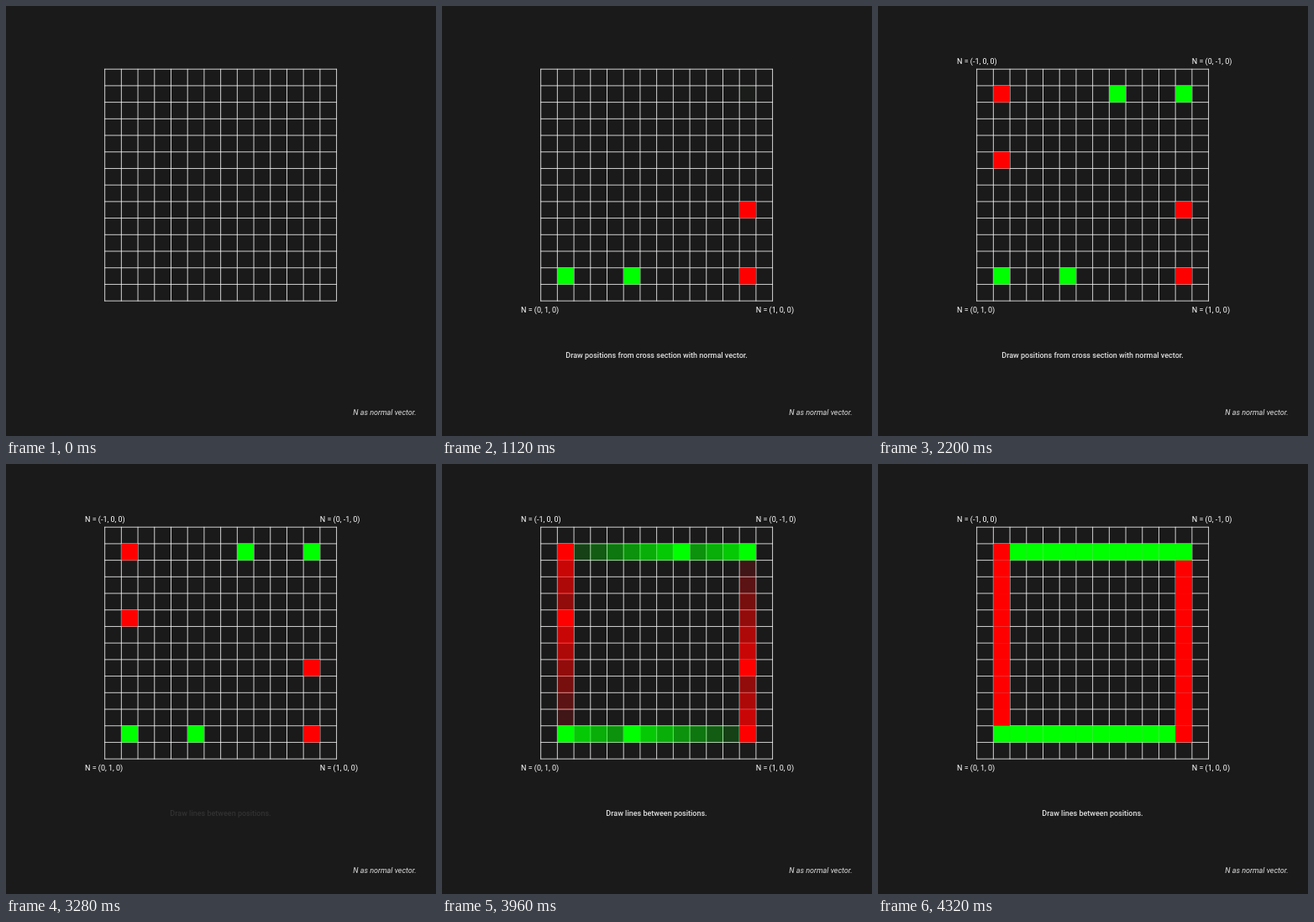
These frames come from a looping animation (512x512 px, 6 s). An HTML page with a canvas:

```html
<!DOCTYPE html>
<html lang="en">
<head>
<meta charset="utf-8">
<title>Normal vectors</title>
<style>
  html, body { margin: 0; height: 100%; overflow: hidden; background: #1a1a1a; }
  canvas { display: block; width: 100vw; height: 100vh; }
</style>
</head>
<body>
<canvas id="stage" width="512" height="512"></canvas>
<script>
const ctx = document.getElementById('stage').getContext('2d');
const LOOP = 6000;
const COUNT = 14, SIZE = 19.71, LEFT = 117.65, TOP = 75.2;
const START = 70, BEAT = 262;            // points appear one beat after another
const FILL = 3640, STEP = 50, FADE = 420; // lines grow cell by cell
const GREEN = '#0f0', RED = '#f00';

// Each side starts at a corner cell and runs along its direction.
const sides = [
  { col: 1, row: 12, dx: 1, dy: 0, color: GREEN, text: 'N = (0, 1, 0)', x: 94, y: 364.5 },
  { col: 12, row: 12, dx: 0, dy: -1, color: RED, text: 'N = (1, 0, 0)', x: 373.8, y: 364.5 },
  { col: 12, row: 1, dx: -1, dy: 0, color: GREEN, text: 'N = (0, -1, 0)', x: 373.8, y: 68.7 },
  { col: 1, row: 1, dx: 0, dy: 1, color: RED, text: 'N = (-1, 0, 0)', x: 94, y: 68.7 }
];

const ramp = (t, start, length) => Math.min(1, Math.max(0, (t - start) / length));

function label(text, x, y, alpha, style = '', align = 'left', color = '#fff') {
  ctx.globalAlpha = alpha;
  ctx.font = style + ' 9px Roboto, sans-serif';
  ctx.textAlign = align;
  ctx.fillStyle = color;
  ctx.fillText(text, x, y);
}

function grid() {
  const span = COUNT * SIZE;
  ctx.globalAlpha = 1;
  ctx.strokeStyle = '#fff';
  ctx.lineWidth = 0.8;
  ctx.beginPath();
  for (let i = 0; i <= COUNT; i++) {
    const d = i * SIZE;
    ctx.moveTo(LEFT + d, TOP - 0.4);
    ctx.lineTo(LEFT + d, TOP + span + 0.4);
    ctx.moveTo(LEFT - 0.4, TOP + d);
    ctx.lineTo(LEFT + span + 0.4, TOP + d);
  }
  ctx.stroke();
}

function drawSide(side, index, t) {
  const first = START + 2 * index * BEAT;
  for (let k = 0; k < 11; k++) {
    const isPoint = k % 4 === 0 && k < 8;
    ctx.globalAlpha = isPoint
      ? ramp(t, first + k / 4 * BEAT, BEAT)
      : ramp(t, FILL + (k < 4 ? k - 1 : k - 5) * STEP, FADE);
    ctx.fillStyle = side.color;
    ctx.fillRect(LEFT + (side.col + k * side.dx) * SIZE,
                 TOP + (side.row + k * side.dy) * SIZE, SIZE, SIZE);
  }
  label(side.text, side.x, side.y, ramp(t, first, BEAT));
}

function draw(t) {
  ctx.globalAlpha = 1;
  ctx.fillStyle = '#1a1a1a';
  ctx.fillRect(0, 0, 512, 512);
  grid();
  sides.forEach((side, i) => drawSide(side, i, t));
  label('Draw positions from cross section with normal vector.', 255.5, 419,
        ramp(t, START, BEAT) - ramp(t, 2735, 335), '500', 'center', '#e0e0e0');
  label('Draw lines between positions.', 255.5, 419,
        ramp(t, 3240, 340), '500', 'center', '#e0e0e0');
  label('N as normal vector.', 488.5, 487, 1, 'italic', 'right', '#e0e0e0');
}

function frame(now) {
  draw(now % LOOP);
  requestAnimationFrame(frame);
}
requestAnimationFrame(frame);
</script>
</body>
</html>
```
